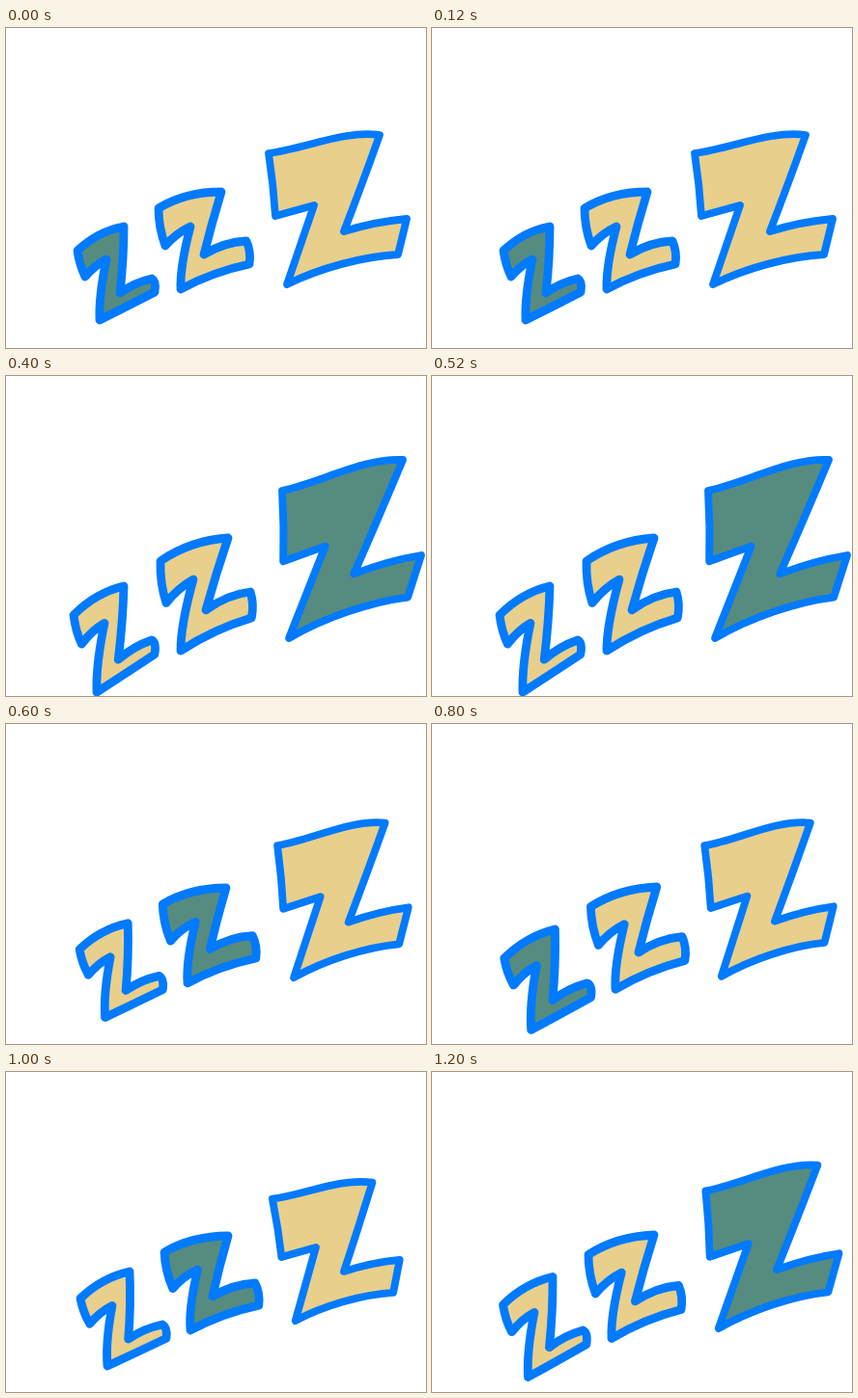
These frames come from a looping animation (435 px wide and 332 px high, 1400 ms). An HTML page:

```html
<!DOCTYPE html>
<html lang="en">
<head>
<meta charset="utf-8">
<title>Zzz</title>
<style>
  html, body { margin: 0; width: 100%; height: 100%; overflow: hidden; background: #fff; }
  svg { display: block; width: 100%; height: 100%; }
  path { stroke: #007aff; stroke-linejoin: round; }
</style>
</head>
<body>
<svg id="stage" viewBox="0 0 435 332"></svg>
<script>
const STEP = 200, STEPS = 7;
const SAND = '#e8cf8b', GREEN = '#568b7f';

// Strength of each movement at every step of the loop.
const SAG = [0, .5, 1, 0, .5, 0, .5];
const SWAY = [0, .6, 0, .7, .9, 1, .5];
const GROW = [0, .35, 1, .35, .35, -.15, .6];

// Corners: top left, top right, arm tip, bottom left.
// "pull" and "sway" say how far each corner travels at full strength.
const letters = [
  {
    width: 8.8,
    outline: 'M74,231 Q95,211 122,206 Q122,240 118,275 Q133,264 151,260 Q156,263 154,274 Q127,288 97,303 Q96,278 104,240 Q92,246 82,258 Q76,246 74,231 Z',
    corners: [74, 231, 122, 206, 151, 260, 97, 303],
    pull: [-4, 17, 0, 12, 0, 14, -3, 25],
    sway: [3, 4, 6, 1, 11, 2, 8, 2],
    force: SAG
  },
  {
    width: 8.8,
    outline: 'M158,187 Q186,170 223,170 Q213,203 205,235 Q226,222 249,221 Q254,232 252,245 Q214,253 181,271 Q180,248 191,206 Q176,213 165,226 Q158,207 158,187 Z',
    corners: [158, 187, 223, 170, 249, 221, 181, 271],
    pull: [2, 5, 7, -2, 4, 3, 0, 14],
    sway: [6, 0, 7, 0, 9, -2, 10, -3],
    force: SAG
  },
  {
    width: 7.8,
    outline: 'M272,130 C310,125 350,106 387,111 Q370,159 350,211 Q382,201 415,198 L406,235 C370,237 325,249 291,266 L319,184 L279,195 Q277,163 272,130 Z',
    corners: [272, 130, 387, 111, 415, 198, 291, 266],
    pull: [14, -11, 24, -24, 15, -12, 2, 6],
    sway: [6, 0, -4, 0, -5, -5, 9, -7],
    force: GROW
  }
];

// Position of a point measured along the top edge and the left side.
function locate([x0, y0, x1, y1, , , x3, y3], x, y) {
  const ax = x1 - x0, ay = y1 - y0, bx = x3 - x0, by = y3 - y0;
  const det = ax * by - ay * bx;
  x -= x0;
  y -= y0;
  return [(x * by - y * bx) / det, (ax * y - ay * x) / det];
}

// Redraws an outline so that its corners land on new places.
function warp(outline, from, to) {
  const [tipU, tipV] = locate(from, from[4], from[5]);
  const axis = (i, u, v) => {
    const flat = (s, t) => to[i] + s * (to[2 + i] - to[i]) + t * (to[6 + i] - to[i]);
    const bend = (to[4 + i] - flat(tipU, tipV)) / (tipU * tipV);
    return (flat(u, v) + u * v * bend).toFixed(2);
  };
  return outline.replace(/(\d+),(\d+)/g, (_, x, y) => {
    const [u, v] = locate(from, +x, +y);
    return axis(0, u, v) + ',' + axis(1, u, v);
  });
}

function shapeAt({ outline, corners, pull, sway, force }, step) {
  const moved = corners.map((c, i) => c + force[step] * pull[i] + SWAY[step] * sway[i]);
  return warp(outline, corners, moved);
}

const stage = document.getElementById('stage');
const paths = letters.map(({ width }) => {
  const path = document.createElementNS('http://www.w3.org/2000/svg', 'path');
  path.setAttribute('stroke-width', width);
  stage.append(path);
  return path;
});

function draw(time) {
  const step = Math.floor(time / STEP) % STEPS;
  const lit = 2 - Math.abs(2 - step % 4); // green bounces between the letters
  letters.forEach((letter, i) => {
    paths[i].setAttribute('d', shapeAt(letter, step));
    paths[i].setAttribute('fill', i === lit ? GREEN : SAND);
  });
}

const start = performance.now();
function tick() {
  draw(performance.now() - start);
  requestAnimationFrame(tick);
}
tick();
</script>
</body>
</html>
```
